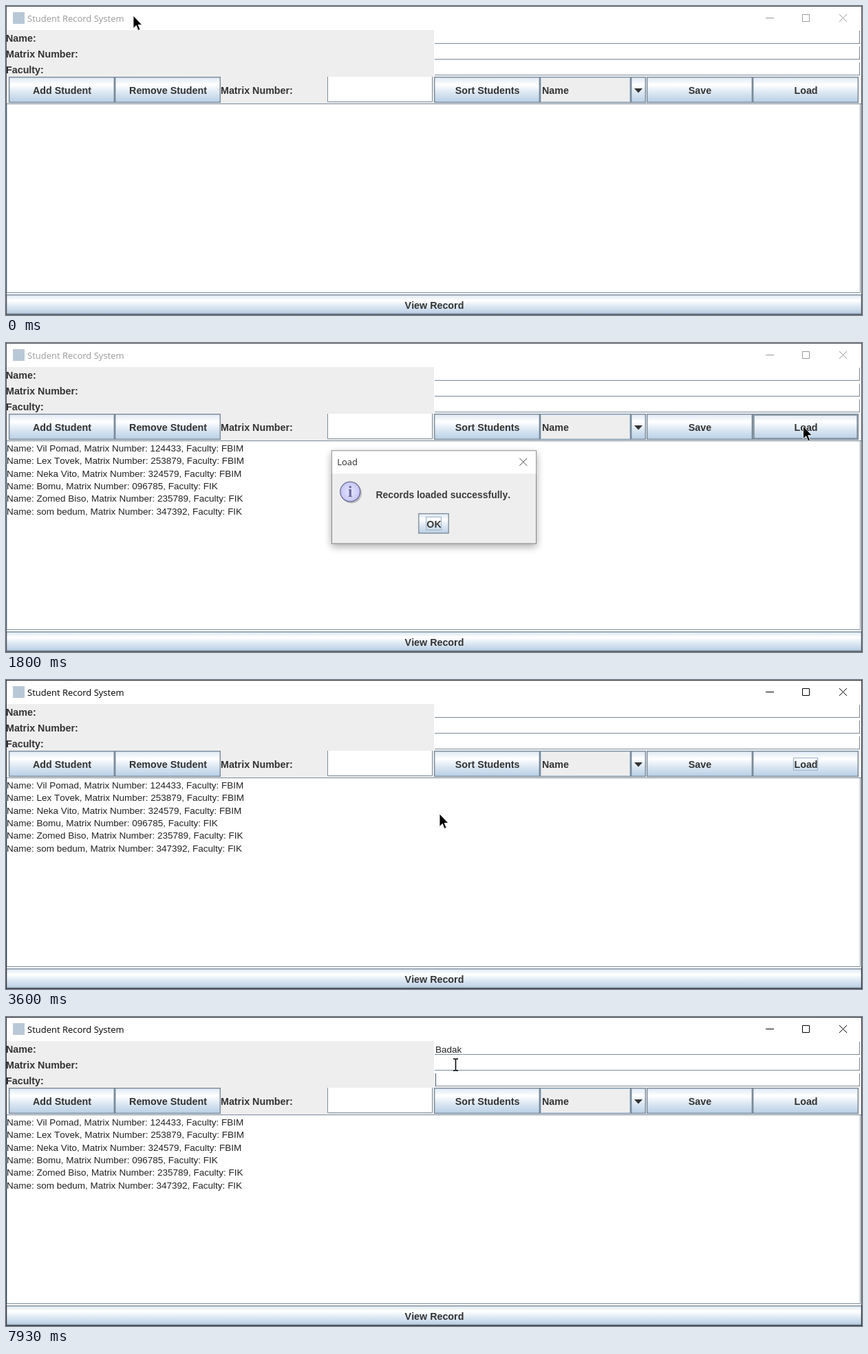
Write an HTML page that moves like this. It is 1244x450 px and loops after 8000 ms.

```html
<!DOCTYPE html>
<html lang="en">
<head>
<meta charset="utf-8">
<title>Student Record System</title>
<style>
html, body { margin: 0; width: 100%; height: 100%; overflow: hidden; background: #fff; }
svg { display: block; width: 1244px; height: 450px; }
text { font: 13.5px "Liberation Sans", Arial, sans-serif; font-kerning: none; fill: #222; white-space: pre; }
.bold, .btn text { font-weight: bold; font-size: 14.3px; fill: #333; }
.btn text { text-anchor: middle; }
.msg { font-size: 14px; }
.title { font: 13px "Open Sans", "Noto Sans", sans-serif; }
.btn .face { fill: url(#metal); stroke: #7a8a99; stroke-width: 1.4; }
.btn.down .face { fill: #b8cfe5; }
.btn .glow { fill: none; stroke: #7a8a99; stroke-width: 1.4; visibility: hidden; }
.btn.hover .glow { visibility: visible; }
.ring { fill: none; stroke: #a3b8cc; stroke-width: 1.2; }
.pale { fill: none; stroke: #b8cfe5; }
.edge { fill: none; stroke: #7a8a99; }
#frame, #controls { fill: none; stroke: #555; }
#controls { stroke: #999; }
#caption { fill: #999; }
.active #frame { stroke: #333; }
.active #controls { stroke: #000; }
.active #caption { fill: #000; }
</style>
</head>
<body>
<svg id="stage" viewBox="0 0 1244 450">
  <defs>
    <linearGradient id="metal" x2="0" y2="1">
      <stop stop-color="#dde8f3"/><stop offset=".3" stop-color="#fff"/>
      <stop offset=".6" stop-color="#dde8f3"/><stop offset="1" stop-color="#b8cfe5"/>
    </linearGradient>
    <radialGradient id="ball"><stop offset=".3" stop-color="#dcdcff"/><stop offset="1" stop-color="#c4c4f4"/></radialGradient>
    <filter id="shadow" x="-10%" y="-15%" width="120%" height="135%">
      <feDropShadow dx="0" dy="4" stdDeviation="6" flood-opacity=".35"/>
    </filter>
  </defs>
  <rect width="1244" height="450" fill="#fff"/>
  <rect x="10" y="9" width="17" height="17" fill="#b9c8d6"/>
  <text class="title" id="caption" x="31" y="23">Student Record System</text>
  <path id="controls" d="M1104 17.5h12M1157.5 12.5h10v10h-10zM1211 12l11 11m0-11l-11 11"/>
  <path fill="#eee" d="M1 35h621v67h621v40H1z"/>
  <g id="form"></g>
  <g id="rows"></g>
  <text id="typed" x="624" y="52"></text>
  <path id="caret" stroke="#456" d="M0 0v18"/>
  <rect id="frame" x=".5" y=".5" width="1243" height="449"/>
  <g id="dialog">
    <rect x="472.5" y="156.5" width="299" height="136" fill="#eee" stroke="#777" filter="url(#shadow)"/>
    <path fill="#fff" d="M473 157h298v33H473z"/>
    <text class="title" x="480.5" y="178">Load</text>
    <path stroke="#444" d="M747 167.5l11 11m0-11l-11 11"/>
    <circle cx="501.5" cy="218.5" r="15" fill="#999" opacity=".6"/>
    <circle cx="499.5" cy="216.5" r="14.5" fill="url(#ball)" stroke="#669" stroke-width="1.3"/>
    <text x="499.5" y="224" text-anchor="middle" style="font:bold 23px 'Liberation Serif',serif;fill:#669">i</text>
    <text class="bold msg" x="537" y="226">Records loaded successfully.</text>
  </g>
  <path id="arrow" d="M0 0V18.5L4.3 14.4L7.1 21.5L10 20.3L7.1 13.4H12.7Z" stroke="#fff" stroke-width=".8"/>
  <path id="beam" d="M-3.5-8.5h2.5l1 1 1-1h2.5M0-7.5v15M-3.5 8.5h2.5l1-1 1 1h2.5" fill="none" stroke="#000" stroke-width="1.5"/>
</svg>
<script>
const $ = id => document.getElementById(id);
const add = (id, html) => $(id).insertAdjacentHTML('beforeend', html);
const show = (el, on) => el.setAttribute('visibility', on ? 'visible' : 'hidden');
const place = (el, x, y) => el.setAttribute('transform', `translate(${x} ${y})`);

const box = (cls, x, y, w, h) => `<rect class="${cls}" x="${x}" y="${y}" width="${w}" height="${h}"/>`;
const button = (x, y, w, h, label, id = '') => `<g class="btn" id="${id}">
  ${box('face', x + .7, y + .7, w - 1.4, h - 1.4)}${box('glow', x + 2, y + 2, w - 4, h - 4)}
  <text x="${x + w / 2 + .5}" y="${Math.round(y + h / 2 + 6)}">${label}</text></g>`;
const label = (x, y, s) => `<text class="bold" x="${x}" y="${y}">${s}</text>`;

['Name:', 'Matrix Number:', 'Faculty:'].forEach((s, i) => {
  const y = 35 + 23 * i;
  add('form', label(0, y + 17, s) +
    `<path class="edge" d="M623 ${y + 19.5}H1240M1240.5 ${y + 1}v19"/>`);
});
add('form',
  button(4, 103, 154, 38, 'Add Student') +
  button(158, 103, 154, 38, 'Remove Student') +
  label(312, 128, 'Matrix Number:') +
  '<path fill="#fff" d="M467 103h153v37H467z"/><path class="edge" d="M467.5 103v36.5H619.5V103"/>' +
  button(622, 103, 154, 38, 'Sort Students') +
  box('edge', 776.5, 103.5, 131, 37) + box('pale', 777.5, 104.5, 129, 35) +
  label(779, 128, 'Name') +
  button(908, 103, 22, 38, '') + '<path fill="#333" d="M913 120h12l-6 6.5z"/>' +
  button(931, 103, 154, 38, 'Save') +
  button(1085, 103, 154, 38, 'Load', 'load') +
  '<rect id="focus" class="ring" x="1144.5" y="113.5" width="35" height="18"/>' +
  '<path class="edge" d="M1 142.5H1243M1241.5 143V417.5H1"/><path class="pale" d="M1.5 143V417"/>' +
  button(0, 420, 1244, 29, 'View Record'));
add('dialog', button(599, 248, 45, 30, 'OK', 'ok') + box('ring', 610.5, 253.5, 22, 19));

[
  ['Vil Pomad', '124433', 'FBIM'], ['Lex Tovek', '253879', 'FBIM'], ['Neka Vito', '324579', 'FBIM'],
  ['Bomu', '096785', 'FIK'], ['Zomed Biso', '235789', 'FIK'], ['som bedum', '347392', 'FIK']
].forEach(([name, no, faculty], i) => add('rows',
  `<text x="1" y="${Math.round(158 + 18.3 * i)}">Name: ${name}, Matrix Number: ${no}, Faculty: ${faculty}</text>`));

// Pointer path: time, x, y
const path = [
  [70, 185, 14], [300, 450, 50], [550, 900, 120], [750, 1130, 139], [870, 1166, 126],
  [930, 1166, 126], [1070, 1163, 122], [1600, 1163, 122], [1800, 1159, 121],
  [2000, 1060, 140], [2250, 820, 205], [2400, 772, 222], [2650, 690, 238], [2900, 590, 248],
  [3130, 618, 257], [3200, 622, 256], [3400, 622, 256], [3650, 632, 180], [3950, 642, 60],
  [4070, 640, 48], [4530, 640, 48], [4800, 655, 50], [6530, 655, 50], [6600, 656, 52],
  [6870, 656, 52], [7070, 652, 57], [7200, 652, 57], [7470, 654, 88], [7670, 654, 88], [7930, 653.5, 69.5]
];
function pointer(t) {
  const i = path.findIndex(p => p[0] > t);
  if (i === 0) return path[0].slice(1);
  if (i < 0) return path[path.length - 1].slice(1);
  const [t0, x0, y0] = path[i - 1], [t1, x1, y1] = path[i], k = (t - t0) / (t1 - t0);
  return [x0 + (x1 - x0) * k, y0 + (y1 - y0) * k];
}

const word = 'Badak', keys = [5400, 5730, 5930, 6070, 6200];
const within = (t, a, b) => t >= a && t < b;
const ramp = (t, a, d) => Math.min(1, Math.max(0, (t - a) / d));

function draw(t) {
  const [x, y] = pointer(t);
  const inField = t >= 3600 && x > 623 && y < 102;
  show($('arrow'), !inField);
  show($('beam'), inField);
  place($('arrow'), x, y);
  place($('beam'), x, y);

  $('stage').classList.toggle('active', within(t, 1200, 1600) || t >= 3400);
  $('load').classList.toggle('hover', t < 3400 && (t > 1600 || x > 1085));
  $('load').classList.toggle('down', within(t, 1200, 1600));
  show($('focus'), within(t, 1200, 1600) || within(t, 3400, 4270));
  show($('rows'), t >= 1600);

  const open = 1 - (1 - ramp(t, 1600, 250)) ** 2, shut = ramp(t, 3400, 170);
  const scale = .85 + .15 * open - .1 * shut;
  $('dialog').setAttribute('opacity', open * (1 - shut));
  $('dialog').setAttribute('transform', `translate(622 224) scale(${scale}) translate(-622 -224)`);
  const overOk = t > 2400 && x > 599 && x < 644 && y > 248;
  $('ok').classList.toggle('hover', overOk);
  $('ok').classList.toggle('down', t >= 3200);

  const count = keys.filter(k => t >= k).length;
  $('typed').textContent = word.slice(0, count);
  const inFaculty = t >= 7600;
  show($('caret'), within(t, 4270, 4770) || within(t, 5270, 6730) || t >= 7270);
  const width = count ? $('typed').getComputedTextLength() : 0;
  place($('caret'), inFaculty ? 624.5 : 624.5 + Math.round(width), inFaculty ? 82 : 36.5);
}

(function tick() {
  draw(performance.now() % 8000);
  requestAnimationFrame(tick);
})();
</script>
</body>
</html>
```
